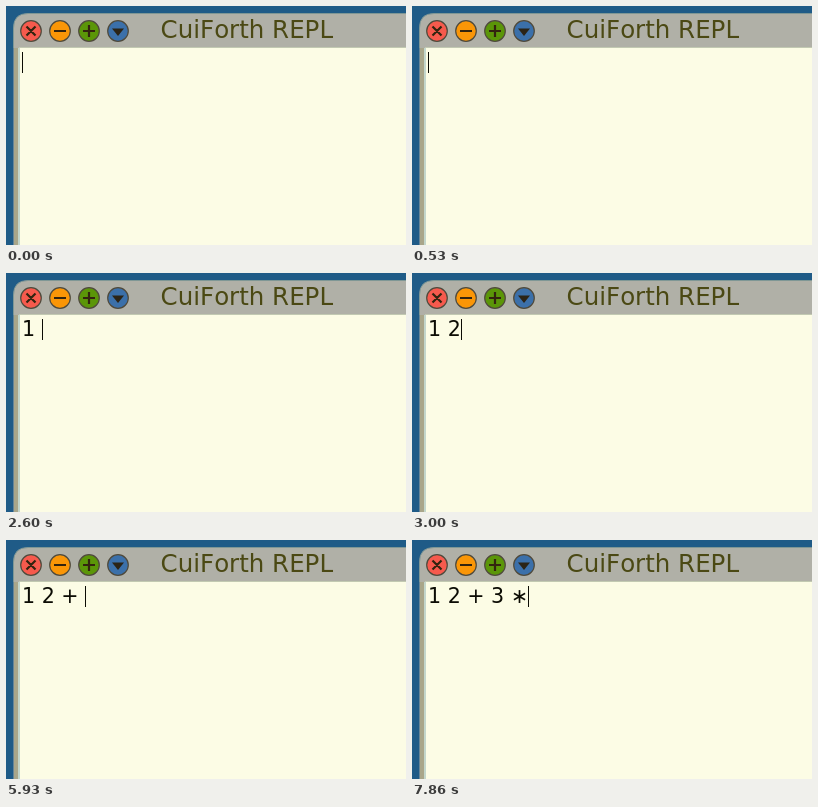
Recreate the animation shown at these times as an HTML page. Size 400 px wide and 239 px high, loop 8 s.

```html
<!DOCTYPE html>
<html lang="en">
<head>
<meta charset="utf-8">
<title>CuiForth REPL</title>
<style>
  html, body { margin: 0; width: 100%; height: 100%; overflow: hidden; background: #1f5b87; }
  #stage { position: relative; width: 400px; height: 239px; overflow: hidden; }
  svg { position: absolute; left: 0; top: 0; }
  text { font: 24.5px "DejaVu Sans", sans-serif; font-kerning: none; fill: #4b4914; }
  #line {
    position: absolute; left: 16px; top: 45px; height: 23px;
    font: 20.6px/23px "DejaVu Sans", sans-serif; font-kerning: none;
    white-space: pre; color: #0c0c04;
  }
  #caret {
    position: absolute; left: 100%; top: 1px; width: 1px; height: 21px;
    background: #0c0c04;
  }
</style>
</head>
<body>
<div id="stage">
  <svg width="400" height="239" viewBox="0 0 400 239">
    <path d="M7.5 239V22Q7.5 7.5 22 7.5H400V239Z" fill="#b0b0a7"/>
    <path d="M7.5 42V22Q7.5 7.5 22 7.5H400" fill="none" stroke="#7f9795"/>
    <path d="M8 42H13V239H8Z" fill="#a9a68a"/>
    <path d="M12 42H14V239H12Z" fill="#c3d6cb"/>
    <path d="M13 41H400V42H13Z" fill="#c2c9b2"/>
    <path d="M14 42H400V239H14Z" fill="#fcfce5"/>
    <g stroke="#4f4a3c" stroke-width="1.2">
      <circle cx="25" cy="25" r="10.3" fill="#f65a4d"/>
      <circle cx="54" cy="25" r="10.3" fill="#fa9607"/>
      <circle cx="83" cy="25" r="10.3" fill="#5b9608"/>
      <circle cx="112" cy="25" r="10.3" fill="#3b70aa"/>
    </g>
    <path d="M20.5 20.5l9 9m0-9l-9 9M48 25h12M77 25h12M83 19v12" fill="none" stroke="#33240f" stroke-width="2.2"/>
    <path d="M106 22.5h12l-6 7.5z" fill="#2b2417"/>
    <text x="154.6" y="32">CuiForth REPL</text>
  </svg>
  <div id="line"><span id="typed"></span><i id="caret"></i></div>
</div>
<script>
  const LOOP = 8000;
  const INPUT = "1 2 + 3 \u2217";

  // Times at which each character of INPUT appears.
  const keyTimes = [1600, 2600, 2660, 3660, 3800, 4200, 6600, 6860, 7730];
  // The caret starts visible and toggles at each of these times.
  const blinkTimes = [60, 530, 1060, 1600, 2060, 2530, 3060, 3530, 4130, 4730,
                      5130, 5660, 6130, 6600, 6930, 7400];

  const typed = document.getElementById("typed");
  const caret = document.getElementById("caret");
  const start = performance.now();
  const countPassed = (times, t) => times.filter(time => time <= t).length;

  function draw() {
    const t = (performance.now() - start) % LOOP;
    typed.textContent = INPUT.slice(0, countPassed(keyTimes, t));
    caret.style.visibility = countPassed(blinkTimes, t) % 2 ? "hidden" : "visible";
    requestAnimationFrame(draw);
  }
  draw();
</script>
</body>
</html>
```
